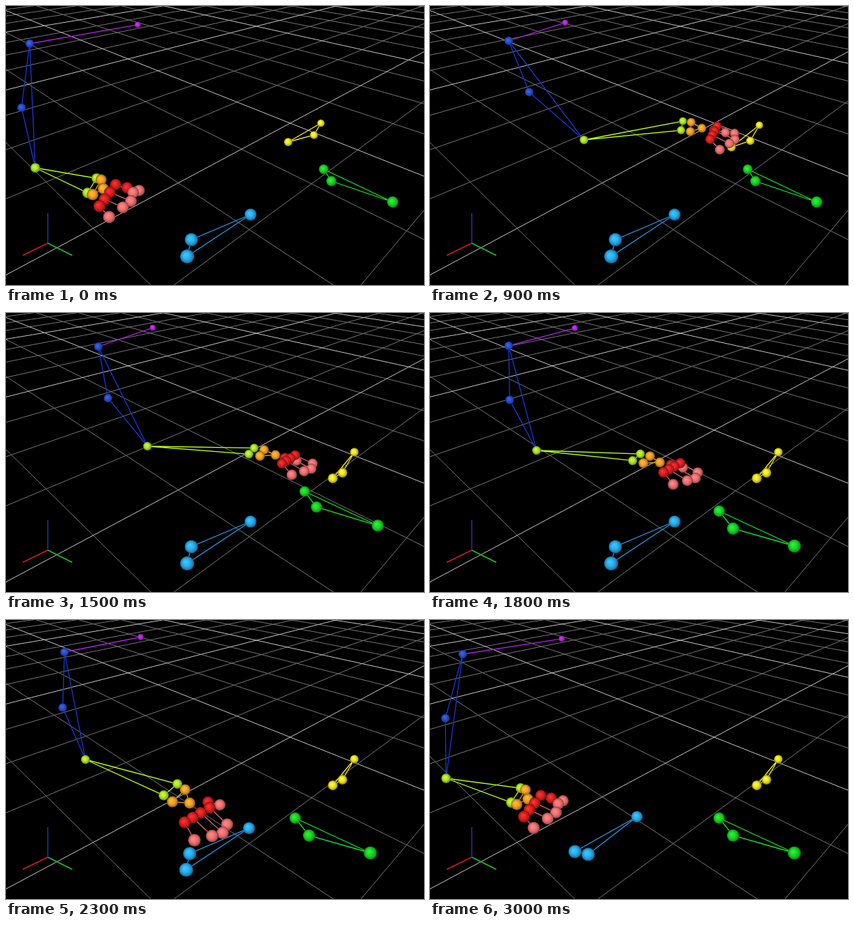
Recreate the animation shown at these times as an HTML page with a canvas. Size 600 px wide and 400 px high, loop 3.1 s.

```html
<!DOCTYPE html>
<html lang="en">
<head>
<meta charset="utf-8">
<title>Marker skeleton</title>
<style>
html, body { margin: 0; height: 100%; overflow: hidden; background: #000; }
canvas { display: block; }
</style>
</head>
<body>
<canvas id="stage" width="600" height="400"></canvas>
<script>
const ctx = document.getElementById('stage').getContext('2d');
const LOOP = 3100, STEP = 100;

// Key poses of the arm; everything else follows from these three joints
const poses = [
  { time: 0, shoulder: [34, 54], elbow: [42, 232], wrist: [130, 247] },
  { time: 500, shoulder: [50, 52], elbow: [92, 224], wrist: [229, 190] },
  { time: 900, shoulder: [113, 50], elbow: [221, 192], wrist: [363, 165] },
  { time: 1300, shoulder: [139, 49], elbow: [230, 188], wrist: [383, 188] },
  { time: 1800, shoulder: [113, 47], elbow: [153, 197], wrist: [302, 202] },
  { time: 2300, shoulder: [84, 46], elbow: [114, 200], wrist: [246, 235] },
  { time: 3000, shoulder: [47, 49], elbow: [23, 227], wrist: [130, 241] }
];

// Triangles that the hand pushes aside in a slightly raised arc
const objects = [
  { color: [250, 240, 32], line: '#f4ec20', begin: 740, end: 1110, lift: 11,
    from: [[405, 195], [442, 185], [452, 168]], to: [[469, 237], [483, 229], [500, 199.5]] },
  { color: [24, 226, 36], line: '#10e81c', begin: 1200, end: 1650, lift: 13,
    from: [[456, 234], [467, 251], [555, 281]], to: [[415, 284], [435, 309], [523, 334]] },
  { color: [40, 182, 250], line: '#2498e4', begin: 2285, end: 2650, lift: 0,
    from: [[351, 299], [266, 335], [260, 359]], to: [[297, 282], [208, 332], [227, 336]] }
];

const clamp = v => Math.min(1, Math.max(0, v));
const add = (p, [x, y], k = 1) => [p[0] + x * k, p[1] + y * k];
const sub = (a, b) => add(a, b, -1);
const mix = (a, b, k) => add(a, sub(b, a), k);
const bump = (t, center, width) => Math.exp(-(((t - center) / width) ** 2));

// Smooth curve of one joint through the key poses
function joint(name, t) {
  const last = poses.length - 1;
  const k = Math.min(last, poses.findIndex(p => p.time >= t) || 1) - 1;
  const a = poses[k], b = poses[k + 1], span = b.time - a.time;
  const u = (t - a.time) / span, v = 1 - u;
  const slope = (n, axis) => {
    const p = poses[Math.max(n - 1, 0)], q = poses[Math.min(n + 1, last)];
    return span * (q[name][axis] - p[name][axis]) / (q.time - p.time);
  };
  return [0, 1].map(axis =>
    v * v * ((1 + 2 * u) * a[name][axis] + u * slope(k, axis)) +
    u * u * ((1 + 2 * v) * b[name][axis] - v * slope(k + 1, axis)));
}

function path(points, color, width = 1.3) {
  ctx.beginPath();
  points.forEach(p => ctx.lineTo(p[0], p[1]));
  ctx.strokeStyle = color;
  ctx.lineWidth = width;
  ctx.stroke();
}

function ball([x, y], r, color) {
  const tone = (k, light = 0) => `rgb(${color.map(c => Math.min(255, c * k + light)).join()})`;
  const shade = ctx.createRadialGradient(x - r * .25, y - r * .25, 0, x, y, r);
  shade.addColorStop(0, tone(1, 22));
  shade.addColorStop(.5, tone(.97));
  shade.addColorStop(.82, tone(.76));
  shade.addColorStop(1, tone(.45));
  ctx.fillStyle = shade;
  ctx.beginPath();
  ctx.arc(x, y, r, 0, 7);
  ctx.fill();
}

// Floor point in perspective: each axis pulls towards its vanishing point
function floor(i, j) {
  const a = -.1143 * i, b = -.117 * j, w = 1 + a + b;
  return [(408 + 950 * a - 322 * b) / w, (168 - 121 * (a + b)) / w];
}

function drawGrid() {
  for (const major of [false, true]) {
    for (let n = -40; n <= 40; n++) {
      if ((n % 4 === 0) !== major) continue;
      const color = major ? '#c4c4c4' : '#747474';
      path([floor(n, -60), floor(n, 8 - n)], color, 1);
      path([floor(-60, n), floor(8 - n, n)], color, 1);
    }
  }
}

function drawAxes() {
  path([[60, 340], [24, 357.5]], '#d81c1c', 1.4);
  path([[60, 340], [95, 357.5]], '#18c828', 1.4);
  path([[60, 340], [60, 297]], '#2438b8', 1.4);
}

function drawObject({ color, line, begin, end, lift, from, to }, t) {
  const p = clamp((t - begin) / (end - begin));
  const marks = from.map((a, n) => add(mix(a, to[n], p), [0, -4 * lift * p * (1 - p)]));
  path([...marks, marks[0]], line);
  marks.forEach(m => ball(m, 1.2 + m[1] * .025, color));
}

function drawArm(t) {
  const [shoulder, elbow, wrist] = ['shoulder', 'elbow', 'wrist'].map(name => joint(name, t));
  const neck = [189 + 22 * bump(t, 1580, 560), 27 - 6 * bump(t, 1550, 800)];
  const upper = add(mix(shoulder, elbow, .51), [-15 - .1 * (elbow[0] - shoulder[0]), 1]);

  // The hand stretches out, turns flat in mid-reach and dips on the way back
  const dip = bump(t, 2300, 350);
  const reach = [20 + 39 * bump(t, 1550, 1200), 10 - 18 * bump(t, 500, 300) + 24 * dip];
  const spread = [-24 + 14 * bump(t, 950, 550) - 12 * dip, 33 - 21 * bump(t, 1550, 1000)];
  const tilt = reach[1] / 2;
  const across = add([reach[0] * .08, reach[1] * .08], spread, .65);
  const wristLow = add(wrist, across);
  const palm = [add(wrist, reach, .24), add(wristLow, reach, .27), add(add(wrist, reach, .58), across, .47)];

  const thumb = add(wrist, [44, 9 + tilt]);
  const index = add(wrist, reach);
  const knuckles = [thumb, ...[0, .36, .68, 1].map(k => add(index, spread, k))];
  const finger = [25, 7 + tilt];
  const indexTip = add(index, finger);
  const littleTip = add(add(index, spread), [14, 12 + .8 * tilt]);
  const tip = (k, bulge) => add(mix(indexTip, littleTip, k), finger, bulge);
  const tips = [add(thumb, [17, 4]), indexTip, tip(.27, .25), tip(.55, .17), littleTip];

  path([neck, shoulder], '#b01ce4');
  path([shoulder, upper, elbow, shoulder], '#1838d4');
  path([elbow, wrist, wristLow, elbow], '#b4fc20');
  path([...palm, palm[0]], '#f8a420');
  path(knuckles, '#d42020');
  knuckles.forEach((p, n) => path([p, tips[n]], '#e06464'));

  const size = p => 2.6 + p[1] * .019;
  ball(neck, 4.5, [196, 36, 236]);
  for (const p of [shoulder, upper]) ball(p, 6.2, [40, 84, 222]);
  for (const p of [elbow, wrist, wristLow]) ball(p, size(p), [180, 242, 36]);
  for (const p of palm) ball(p, size(p) + .5, [255, 168, 36]);
  knuckles.forEach((p, n) => {
    ball(tips[n], size(tips[n]) + .6, [253, 118, 118]);
    ball(p, size(p) + .6, [234, 32, 32]);
  });
}

function draw(now) {
  const t = Math.floor(now % LOOP / STEP) * STEP;
  ctx.fillStyle = '#000';
  ctx.fillRect(0, 0, 600, 400);
  drawGrid();
  drawAxes();
  objects.forEach(o => drawObject(o, t));
  drawArm(t);
}

const start = performance.now();
function tick() {
  draw(performance.now() - start);
  requestAnimationFrame(tick);
}
tick();
</script>
</body>
</html>
```
